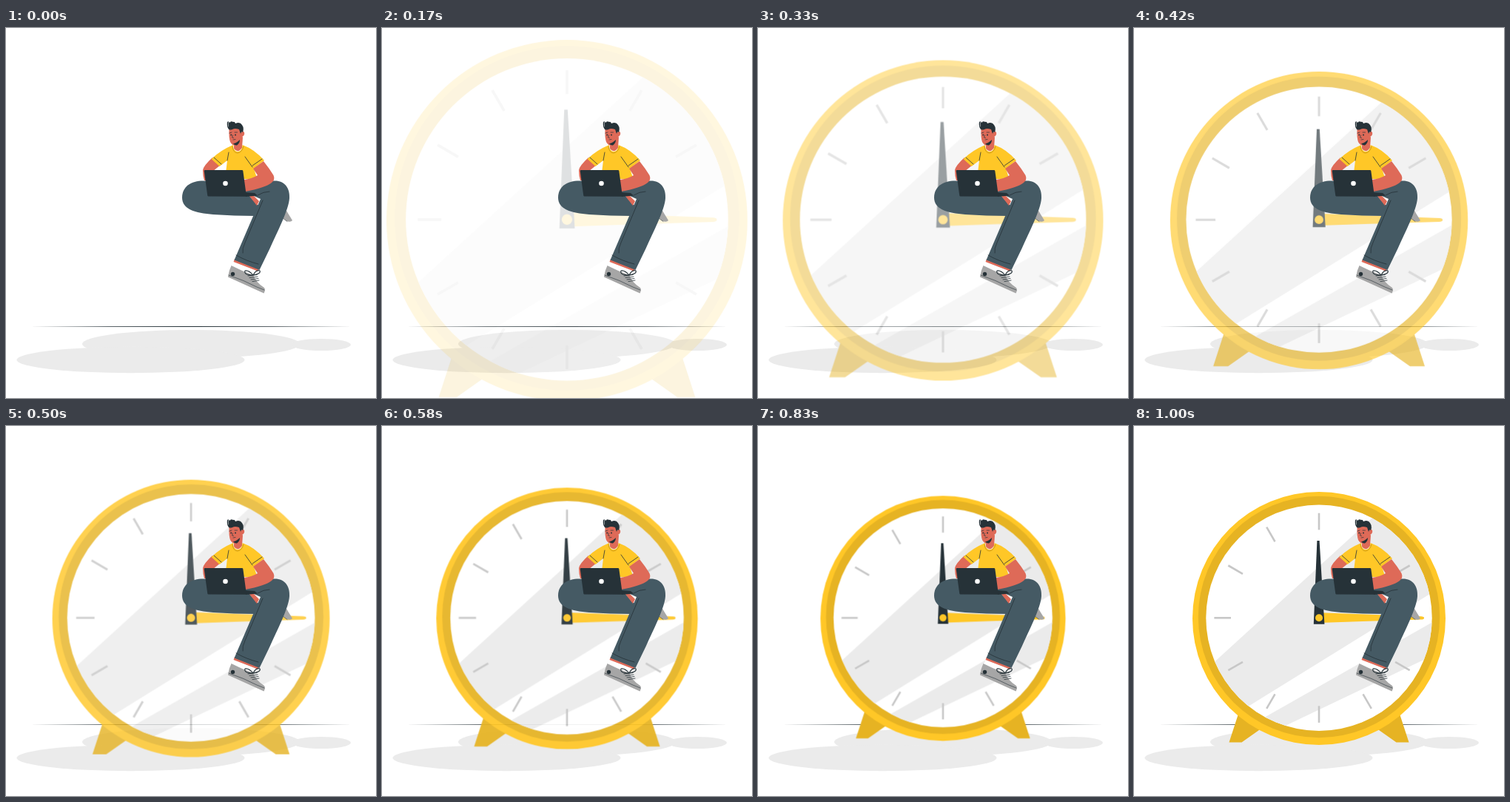
Recreate the animation shown at these times as an HTML page. Size 500x500 px, loop 1040 ms.

```html
<!DOCTYPE html>
<html lang="en">
<head>
<meta charset="utf-8">
<title>Working against the clock</title>
<style>
  html, body { margin: 0; width: 100%; height: 100%; overflow: hidden; background: #fff; }
  svg { display: block; width: 100%; height: 100%; }
  #clock { transform-origin: 250px 260px; opacity: 0; }
  .gold { fill: #ffc727; }
  .ochre { fill: #e6b323; }
  .ink { fill: #263238; }
  .jeans { fill: #455a64; }
  .skin { fill: #de6a58; }
  .pale { fill: #ebebeb; }
  .grey { fill: #a6a6a6; }
  .white { fill: #fff; }
  .line { fill: none; stroke: #263238; stroke-width: .8; stroke-linecap: round; stroke-linejoin: round; }
  #ticks { stroke: #c7c7c7; stroke-width: 2.6; }
</style>
</head>
<body>
<svg viewBox="0 0 500 500">
  <defs>
    <clipPath id="dial"><circle cx="250" cy="259.2" r="152.7"/></clipPath>
  </defs>

  <g id="ground">
    <g class="pale">
      <ellipse cx="250" cy="427" rx="147" ry="19"/>
      <ellipse cx="168.5" cy="448.5" rx="154" ry="17.7"/>
      <ellipse cx="426" cy="428" rx="40" ry="8"/>
    </g>
    <path class="ink" d="M33 403.5Q250 402.5 467 403.5Q250 404.5 33 403.5Z"/>
  </g>

  <g id="clock">
    <path class="ochre" d="M142 386L128.5 427.5H145.5L176 406ZM358 386L371.5 427.5H354.5L324 406Z"/>
    <circle class="gold" cx="250" cy="260" r="171"/>
    <circle class="ochre" cx="250" cy="258" r="163.2"/>
    <circle class="white" cx="250" cy="259.2" r="152.7"/>
    <g class="pale" clip-path="url(#dial)">
      <path d="M333 114L90 336L130 394L420 214.500V100Z"/>
      <path d="M420 255.500L160 403L190 412L420 302.500Z"/>
    </g>
    <g id="ticks"></g>
    <path class="gold" d="M250 252.300L258 252.500L388 257.300Q392 257.500 392 259.400Q392 261.300 388 261.500L309 264L258 265.700H250Z"/>
    <path class="ink" d="M247.400 155H250.600L257.400 267.700H242.800Z"/>
    <circle class="gold" cx="250" cy="259.200" r="5"/>
  </g>

  <g id="worker">
    <!-- folded leg and its shoe -->
    <path class="grey" d="M366 245L379 247L387 260Q385 263 379 261L366 250Z"/>
    <path class="line" d="M374 257L380 261.500" style="stroke-width:.5"/>
    <path class="jeans" d="M275 207C254 204 238 212 238 229C238 245 255 250 280 252Q308 254 338 254L345 240L330 222Z"/>
    <path class="white" d="M327 225L348 221V240L340 239Z"/>
    <path class="skin" d="M328 226L333 225L342 234L339 240Z"/>

    <!-- hanging leg -->
    <path class="white" d="M308 316L337 327L333 332L304 323Z"/>
    <path class="skin" d="M309 312L342 325L340 328.500L307.500 316Z"/>
    <path class="jeans" d="M320 221Q340 211 358 207C375 204 384 215 383 230C382 246 366 277 357 297L342.500 327L308.500 313.500L344 231L335 227Z"/>
    <path class="line" d="M311 307Q325 315 341 319M347 233L323 290Q319 298 320 304M340 226Q348 221 356 221"/>
    <path class="grey" d="M304.500 321Q318 328 334 334Q338 344 349 351Q351 354 348.500 358.500L300 336.500Q301 328 304.500 321Z"/>
    <path class="line" d="M301 334Q322 341 339 350L349 354" style="stroke-width:.6"/>
    <circle class="ink" cx="306.500" cy="332.500" r="2.700"/>
    <path class="line" d="M327 335L339 333.500M329 337.500L340 336M331 340L341 338.500M333 342.500L342 341"/>
    <path class="line" d="M334 334Q321 334 323 328Q328 327 334 334Q338 326 343 328Q345 332 334 334" style="stroke-width:1.100"/>

    <!-- torso and arms -->
    <path class="skin" d="M279 175Q267 186 266 192Q266 200 268 206H276L279 194L290 185Z"/>
    <path class="skin" d="M308 151V163Q313 170 319 162L320 147Z"/>
    <path class="gold" d="M307 158Q290 165 277.500 177L288.500 187L299 179L296 204H339.500L335 190L349 179Q336 164 319.500 158Q319 167 312.500 167Q307 166 307 158Z"/>
    <path class="line" d="M306 160Q307 169 313 169Q319 168 321 160" style="stroke:#c08f13"/>
    <path class="line" d="M281 175L291 184M333 186L346 177M299 179L301 168M333 188L323 174"/>
    <path class="skin" d="M334 190L348 180Q356 190 361.500 199Q364 205 359 209Q350 216 323 221L321 205Q332 204 340 199Z"/>

    <!-- head -->
    <path class="skin" d="M301.500 137Q301 148 303 154Q307 161 313 158Q318 154 319 147Q323 145 322 141Q320 138 318 141L317 134Z"/>
    <path class="ink" d="M307 156Q311 156 316 151Q316 156 312 158.500Q309 159 307 156Z"/>
    <path class="ink" d="M301 137Q298 134 299 127Q301 125 302 128Q304 125 307 127Q309 126 310 129Q316 126 319 131Q322 135 320 141Q318 139 317 143L315 137Q309 135 306 137Q303 138 301 137Z"/>
    <path class="line" d="M302 142L305 141M309 141L312.500 141M306.500 145L305.500 148L307.500 148.500M307 151L310 150.500" style="stroke-width:.7"/>
    <path d="M300.500 127V133" class="line" style="stroke:#fff;stroke-width:.5"/>
    <circle class="ink" cx="304.300" cy="144.500" r="1"/>
    <circle class="ink" cx="310" cy="144.500" r="1"/>

    <!-- laptop -->
    <path class="ink" d="M322 222L336 223L340 226.500L324 228Z"/>
    <path class="ink" d="M269 192H319Q320 192 320.300 193L325 227.800L273.500 227.500Q272.500 227.500 272.300 226.500L267.700 193Q267.700 192 269 192Z"/>
    <circle class="white" cx="296.500" cy="210" r="3.300"/>
  </g>
</svg>
<script>
  const LOOP = 1040, FPS = 24, LEAD = 35;
  const clock = document.getElementById('clock');
  const ticks = document.getElementById('ticks');

  for (let i = 0; i < 12; i++) {
    const tick = document.createElementNS('http://www.w3.org/2000/svg', 'path');
    tick.setAttribute('d', 'M250 117.700V140.300');
    tick.setAttribute('transform', `rotate(${i * 30} 250 259.300)`);
    ticks.append(tick);
  }

  // The curve passes its end value, so the clock shrinks too far and settles back.
  const zoom = clock.animate(
    [{ opacity: 0, transform: 'scale(1.5)' }, { opacity: 1, transform: 'scale(1)' }],
    { duration: 1000, easing: 'cubic-bezier(.36, -.01, .5, 1.38)', fill: 'both' }
  );
  zoom.pause();

  // Steps start on whole hundredths of a second.
  const stepStart = k => Math.round(k * 100 / FPS) * 10;

  function draw() {
    const t = performance.now() % LOOP;
    let k = 0;
    while (k < FPS && stepStart(k + 1) <= t) k++;
    zoom.currentTime = Math.min(1000, k * 1000 / FPS + LEAD);
    requestAnimationFrame(draw);
  }
  draw();
</script>
</body>
</html>
```
